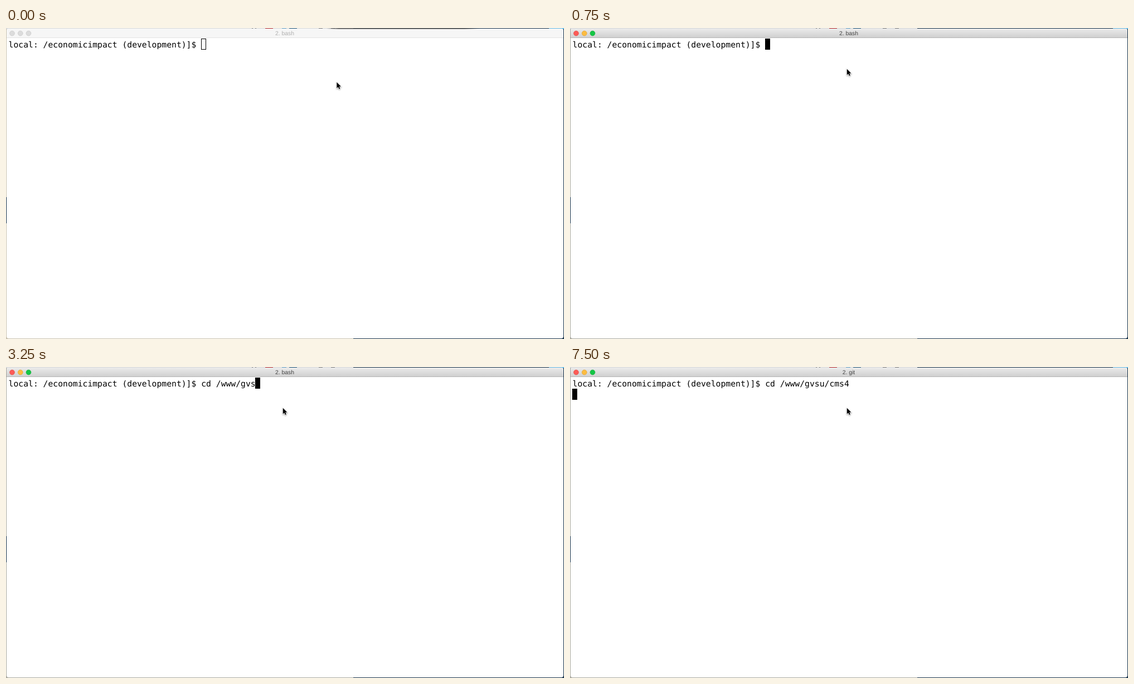
These frames come from a looping animation (1001x559 px, 8000 ms). An HTML page:

```html
<!DOCTYPE html>
<html lang="en">
<head>
<meta charset="utf-8">
<title>Terminal</title>
<style>
  html, body { margin: 0; width: 100%; height: 100%; overflow: hidden; background: #fff; }
  svg { display: block; }
  text { white-space: pre; text-rendering: geometricPrecision; }
  .shell { font: 14.72px "DejaVu Sans Mono", monospace; }
  .title { font: 10.4px "Liberation Sans", Arial, sans-serif; text-anchor: middle; }
</style>
</head>
<body>
<svg width="1001" height="559" viewBox="0 0 1001 559">
  <defs>
    <linearGradient id="bar" x2="0" y2="1">
      <stop stop-color="#ebebeb"/>
      <stop offset="1" stop-color="#d0d0d0"/>
    </linearGradient>
    <linearGradient id="shade">
      <stop stop-color="#555" stop-opacity="0"/>
      <stop offset=".08" stop-color="#555" stop-opacity=".8"/>
      <stop offset=".9" stop-color="#555" stop-opacity=".8"/>
      <stop offset="1" stop-color="#555" stop-opacity="0"/>
    </linearGradient>
  </defs>

  <g id="desktop" shape-rendering="crispEdges">
    <rect id="backdrop" width="1001" height="559"/>
    <path fill="#17324a" d="M623 0H1001V559H623ZM0 304H1V351H0Z"/>
    <path fill="#d6d8d9" d="M0 0H623V2H0Z"/>
    <path fill="#777" d="M441 0h2v1h-2zM447 0h2v1h-2zM561 0h7v1h-7zM583 0h7v1h-7z"/>
    <path fill="#b3262a" d="M465 0h14v2h-14z"/>
    <path fill="#5b9bc4" d="M495 0h8v2h-8z"/>
    <path fill="#1b5378" d="M508 0h14v2h-14z"/>
    <path fill="#63b9e6" d="M974 0h27v2h-27z"/>
  </g>

  <path fill="#fff" d="M1 5Q1 1 5 1H996Q1000 1 1000 5V554Q1000 558 996 558H5Q1 558 1 554Z"/>
  <path id="titlebar" d="M1 17V5Q1 1 5 1H996Q1000 1 1000 5V17Z"/>
  <rect id="divider" x="1" y="17" width="999" height="1"/>
  <rect id="shadow" x="575" width="275" height="2" fill="url(#shade)"/>
  <g id="lights" stroke-width=".7">
    <circle cx="11" cy="9.6" r="4.4"/>
    <circle cx="25.8" cy="9.6" r="4.4"/>
    <circle cx="40.5" cy="9.6" r="4.4"/>
  </g>
  <text id="title" class="title" x="500" y="13.3"></text>

  <text id="line" class="shell" x="4.6" y="35"></text>
  <rect id="caret"/>
  <path id="pointer" d="M0 0V10.8L2.5 8.5L4.2 12.3L6 11.5L4.4 7.8H7.7Z"
        stroke="#fff" stroke-width="1.4" paint-order="stroke"
        style="filter:drop-shadow(0 1px 1px #0006)"/>
</svg>
<script>
const LOOP = 8000, CELL = 8.862, LEFT = 4.5;
const PROMPT = "local: /economicimpact (development)]$ ";
const COMMAND = "cd /www/gvsu/cms4";
const FOCUS = 750, ENTER = 5000, RENAME = 5750;
// [time in ms, characters typed so far]
const KEYS = [[1000, 2], [1250, 3], [2500, 5], [2750, 7], [3000, 9],
              [3250, 11], [3500, 13], [3750, 14], [4000, 16], [ENTER, 17]];
const LIGHTS = [["#fc5b57", "#e2463f"], ["#fdbc40", "#e0a02f"], ["#14c646", "#12ac35"]];

const el = id => document.getElementById(id);
const set = (node, attrs) => {
  for (const key in attrs) node.setAttribute(key, attrs[key]);
};

function draw(t) {
  const active = t >= FOCUS, solid = t >= 500, entered = t >= ENTER;
  const typed = KEYS.reduce((n, [at, count]) => t >= at ? count : n, 0);

  set(el("backdrop"), { fill: solid ? "#aaa99f" : "#c9c1ae" });
  set(el("titlebar"), { fill: active ? "url(#bar)" : "#f6f6f6" });
  set(el("divider"), { fill: active ? "#b5b5b5" : "#e3e3e3" });
  set(el("shadow"), { visibility: t < 250 ? "visible" : "hidden" });
  [...el("lights").children].forEach((light, i) => {
    const [fill, stroke] = active ? LIGHTS[i] : ["#dcdcdc", "#c8c8c8"];
    set(light, { fill, stroke });
  });
  el("title").textContent = t < RENAME ? "2. bash" : "2. git";
  set(el("title"), { fill: active ? "#444" : "#b0b0b0" });

  el("line").textContent = PROMPT + COMMAND.slice(0, typed);
  const column = entered ? 0 : PROMPT.length + typed;
  const x = Math.floor(LEFT + column * CELL), y = entered ? 39 : 19;
  set(el("caret"), solid
    ? { x, y, width: 9, height: 20, fill: "#000", stroke: "none" }
    : { x: x + .5, y: y + .5, width: 8, height: 19, fill: "none", stroke: "#000" });
  set(el("pointer"), { transform: t < 250 ? "translate(593.4 97.5)" : "translate(496.8 73.8)" });
}

const start = performance.now();
function tick() {
  draw((performance.now() - start) % LOOP);
  requestAnimationFrame(tick);
}
tick();
</script>
</body>
</html>
```
